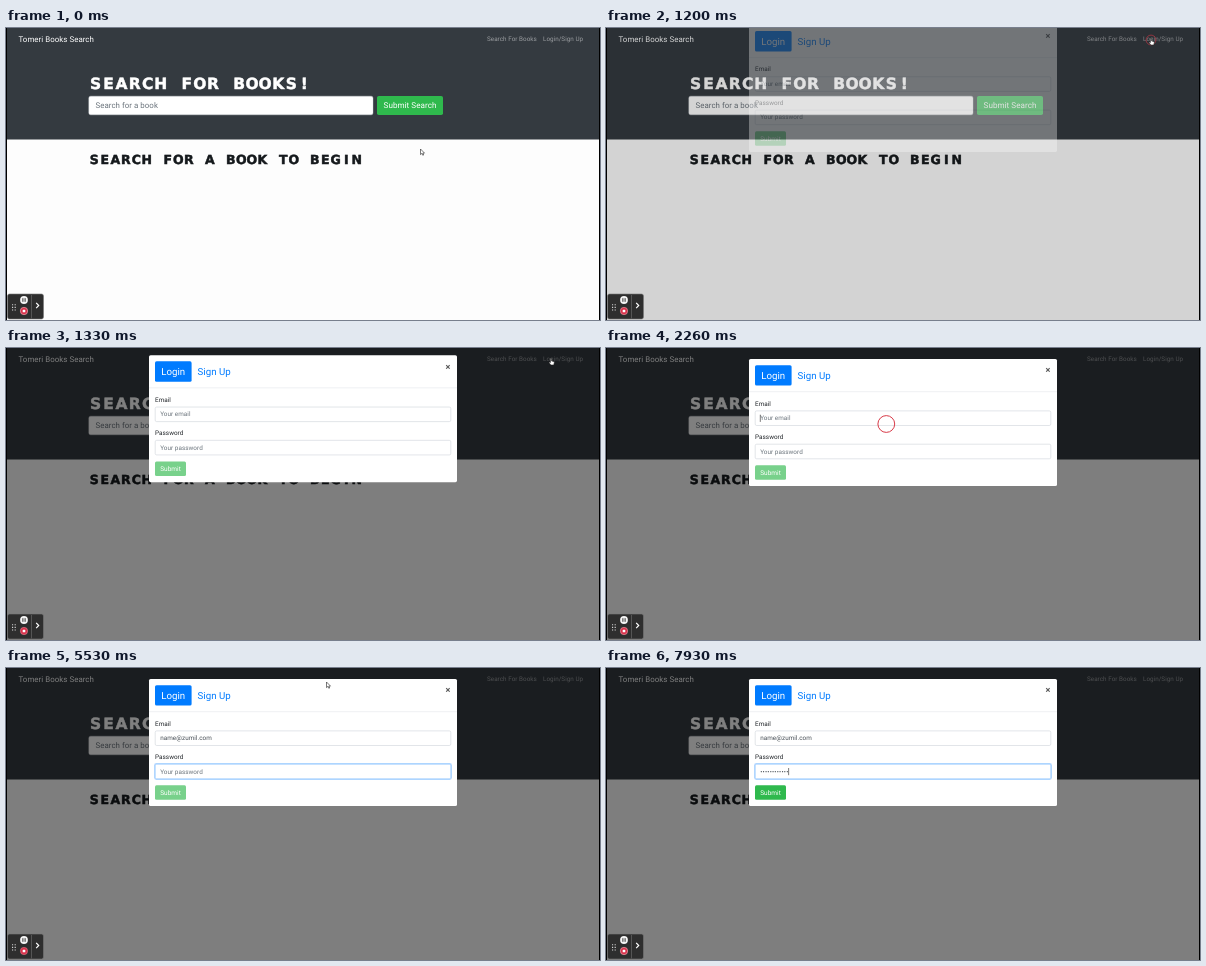
Recreate the animation shown at these times as an HTML page. Size 594x292 px, loop 8000 ms.

```html
<!DOCTYPE html>
<html lang="en">
<head>
<meta charset="utf-8">
<title>Book search login</title>
<style>
  html, body { margin: 0; width: 100%; height: 100%; overflow: hidden; background: #fdfdfd; }
  svg { display: block; width: 594px; height: 292px; }
  text { font-family: Roboto, sans-serif; letter-spacing: .04px; text-rendering: geometricPrecision; white-space: pre; }
  .display { font-family: "DejaVu Sans", sans-serif; font-weight: 700; text-anchor: middle; stroke-width: .5px; }
  .label { font-size: 6.35px; fill: #212529; }
  .value { font-size: 6.35px; }
  .field { fill: #fff; stroke-width: .6px; }
  .halo { fill: none; stroke: #007bff; stroke-width: 1.3px; }
</style>
</head>
<body>
<svg viewBox="0 0 594 292" xmlns="http://www.w3.org/2000/svg">
  <rect width="594" height="292" fill="#fdfdfd"/>
  <rect width="594" height="111.5" fill="#343a40"/>
  <text x="12.5" y="13.7" font-size="7.9" fill="#fff">Tomeri Books Search</text>
  <g font-size="6.3" fill="#fff">
    <text x="481" y="13.2" fill-opacity=".5">Search For Books</text>
    <text id="loginLink" x="537" y="13.2" fill-opacity=".5">Login/Sign Up</text>
  </g>
  <text class="display" data-x="83" data-cell="13.05" y="61.2" font-size="15.5" fill="#fff" stroke="#fff">SEARCH FOR BOOKS!</text>
  <rect x="82.8" y="68.2" width="284.2" height="18.6" rx="1.8" fill="#fff" stroke="#ced4da" stroke-width=".4"/>
  <text x="89.5" y="80.3" font-size="7.9" fill="#6c757d">Search for a book</text>
  <rect x="371" y="68" width="66" height="19" rx="1.8" fill="#2fb94d"/>
  <text x="404" y="80.3" font-size="8.1" fill="#fff" text-anchor="middle">Submit Search</text>
  <text class="display" data-x="83" data-cell="10.5" y="135.5" font-size="12.5" fill="#15191c" stroke="#15191c">SEARCH FOR A BOOK TO BEGIN</text>
  <path d="M.5 0V292M593.5 0V292" stroke="#000"/>

  <rect id="backdrop" width="594" height="292" opacity="0"/>

  <g id="modal" opacity="0">
    <rect x="143" y="11" width="308" height="127" rx="1.6" fill="#fff"/>
    <path d="M143 43.7H451" stroke="#dee2e6" stroke-width=".5"/>
    <rect x="149" y="17.2" width="36.6" height="20.4" rx="1.6" fill="#007bff"/>
    <g font-size="9.7">
      <text x="167.2" y="30.7" fill="#fff" text-anchor="middle">Login</text>
      <text x="191.5" y="30.7" fill="#007bff">Sign Up</text>
    </g>
    <text x="442" y="25.4" font-size="9.2" font-weight="700" fill="#555" text-anchor="middle">×</text>
    <text class="label" x="149" y="57.5">Email</text>
    <text class="label" x="149" y="90.7">Password</text>
    <g id="email" data-y="62.9" data-hint="Your email"></g>
    <g id="password" data-y="96.2" data-hint="Your password"></g>
    <rect id="submit" x="149" y="117.3" width="31" height="14.5" rx="1.5" fill="#2fb94d"/>
    <text x="164.5" y="126.8" font-size="6.5" fill="#fff" text-anchor="middle">Submit</text>
  </g>

  <circle id="ring" fill="none" stroke="#d83a48"/>
  <g id="pointer" fill="#fff" stroke="#222" stroke-width=".6" stroke-linejoin="round">
    <path id="arrow" d="M0 0V5.6L1.4 4.4 2.3 6.3 3.2 5.9 2.3 4.1H4Z"/>
    <path id="hand" d="M-.6.3A.6.6 0 0 1 .6.3V2.5L3 3.1Q3.4 3.3 3.3 4L2.8 6.5H-.2L-2 4Q-1.6 3.2-.6 4Z"/>
  </g>

  <g>
    <rect x="1.5" y="266" width="36" height="25" rx="2" fill="#2e2e2e" stroke="#777" stroke-width=".6"/>
    <path d="M6.6 276.2V282.5M9.2 276.2V282.5" stroke="#ddd" stroke-width="1.1" stroke-dasharray="1.1 1.5"/>
    <circle cx="18" cy="272" r="3.9" fill="#f4f4f4"/>
    <path d="M16.9 270.2V273.8M19.1 270.2V273.8" stroke="#333" stroke-width="1"/>
    <circle id="record" cx="18" cy="283" r="3.7" fill="#d9304a" stroke="#f3b9c0" stroke-width=".6"/>
    <rect x="16.7" y="281.7" width="2.6" height="2.6" rx=".4" fill="#fff"/>
    <path d="M25.5 267V290.5" stroke="#666" stroke-width=".7"/>
    <path d="M30.2 274.9 32.7 277.5 30.2 280.1" fill="none" stroke="#fff" stroke-width="1.2"/>
  </g>
</svg>
<script>
const LOOP = 8000, STEP = 1000 / 15;
const ADDRESS = 'name@zumil.com', SECRET = '•'.repeat(12);
const OPEN = 1150, HIDE = 6150;
const FOCUS = { email: 2200, password: 5000 };
const TYPING = {
  email: { start: 2700, gap: 165, text: ADDRESS },
  password: { start: 6150, gap: 145, text: SECRET }
};
const CLICKS = [
  { down: 1060, up: 1150, x: 545, y: 12 },
  { down: 2200, up: 2290, x: 280.3, y: 76 }
];
// time, x, y
const PATH = [
  [0, 414.5, 121], [130, 414.5, 121], [800, 545, 10.5], [1400, 545, 10.5],
  [1780, 425, 45], [2130, 280, 76], [2300, 280, 76], [2560, 320.5, 14], [LOOP, 320.5, 14]
];

const $ = id => document.getElementById(id);
const clamp = v => Math.max(0, Math.min(1, v));
const mix = (a, b, p) => a + (b - a) * p;
const easeInOut = p => p * p * (3 - 2 * p);
const easeOut = p => 1 - (1 - p) ** 1.7;
const set = (el, attrs) => {
  for (const key in attrs) el.setAttribute(key, attrs[key]);
  return el;
};
const show = (el, on) => set(el, { visibility: on ? 'visible' : 'hidden' });

function add(parent, tag, attrs) {
  const el = set(document.createElementNS('http://www.w3.org/2000/svg', tag), attrs);
  return parent.appendChild(el);
}

// Every letter of a display line is centred in an equal cell.
for (const line of document.querySelectorAll('.display')) {
  const x = +line.dataset.x, cell = +line.dataset.cell;
  set(line, { x: [...line.textContent].map((_, i) => x + (i + .5) * cell).join(' ') });
}

function makeField(name) {
  const group = $(name), y = +group.dataset.y;
  const box = { x: 149.2, y, width: 295.6, height: 14.6, rx: 1.5 };
  return {
    name,
    hint: group.dataset.hint,
    halo: add(group, 'rect', { ...box, x: 148.7, y: y - .5, width: 296.6, height: 15.6, class: 'halo' }),
    frame: add(group, 'rect', { ...box, class: 'field' }),
    label: add(group, 'text', { x: 154.2, y: y + 9.4, class: 'value' }),
    caret: add(group, 'path', { stroke: '#222', 'stroke-width': .6 }),
    y
  };
}
const fields = ['email', 'password'].map(makeField);

function typedCount({ start, gap, text }, t) {
  return Math.max(0, Math.min(text.length, Math.floor((t - start) / gap) + 1));
}

function drawField(field, t) {
  const { name, label, caret, y } = field;
  const typing = TYPING[name], count = typedCount(typing, t);
  const from = FOCUS[name], until = name === 'email' ? FOCUS.password : LOOP;
  const glow = clamp((t - from) / 150) * (1 - clamp((t - until) / 150));

  set(field.halo, { opacity: glow * .28 });
  set(field.frame, { stroke: glow > .2 ? '#80bdff' : '#ced4da' });
  label.textContent = count ? typing.text.slice(0, count) : field.hint;
  label.style.fill = count ? '#495057' : '#6c757d';
  label.style.letterSpacing = count && name === 'password' ? '.22px' : '';

  const lastKey = count ? typing.start + (count - 1) * typing.gap : from;
  const focused = t >= from && t < until;
  const lit = focused && (t - lastKey) % 1000 < 500;
  const x = 154.3 + (count && lit ? label.getComputedTextLength() : 0);
  set(caret, { d: `M${x} ${y + 3.8}v7.2` });
  set(caret, { opacity: lit ? 1 : 0 });
}

function drawPointer(t) {
  const i = PATH.findIndex((point, n) => n && t < point[0]);
  const [t0, x0, y0] = PATH[i - 1], [t1, x1, y1] = PATH[i];
  const p = easeInOut((t - t0) / (t1 - t0));
  const hand = t >= 780 && t < 1410;
  const overInput = t >= 2110 && t < 2320;
  set($('pointer'), { transform: `translate(${mix(x0, x1, p)} ${mix(y0, y1, p)})` });
  show($('hand'), hand);
  show($('arrow'), !hand && !overInput && t < HIDE);
}

function drawRing(t) {
  const click = CLICKS.find(c => t >= c.down && t < c.up + 120);
  show($('ring'), !!click);
  if (!click) return;
  const left = 1 - clamp((t - click.up) / 120);
  set($('ring'), { cx: click.x, cy: click.y, r: 8.4 * left, opacity: left });
}

function draw(t) {
  const fade = clamp((t - OPEN) / 150);
  const slide = easeOut(clamp((t - OPEN) / 300));
  set($('loginLink'), { 'fill-opacity': t >= 780 && t < OPEN ? .75 : .5 });
  set($('backdrop'), { opacity: fade * .5 });
  set($('modal'), { opacity: fade, transform: `translate(0 ${-19.25 * (1 - slide)})` });
  fields.forEach(field => drawField(field, t));
  set($('submit'), { opacity: typedCount(TYPING.password, t) ? 1 : .65 });
  set($('record'), { 'stroke-opacity': .75 + .25 * Math.cos(t / 1000 * Math.PI * 2) });
  drawRing(t);
  drawPointer(t);
}

const began = performance.now();
function tick() {
  const t = (performance.now() - began) % LOOP;
  draw(Math.floor((t + 4) / STEP) * STEP % LOOP);
  requestAnimationFrame(tick);
}
tick();
</script>
</body>
</html>
```
